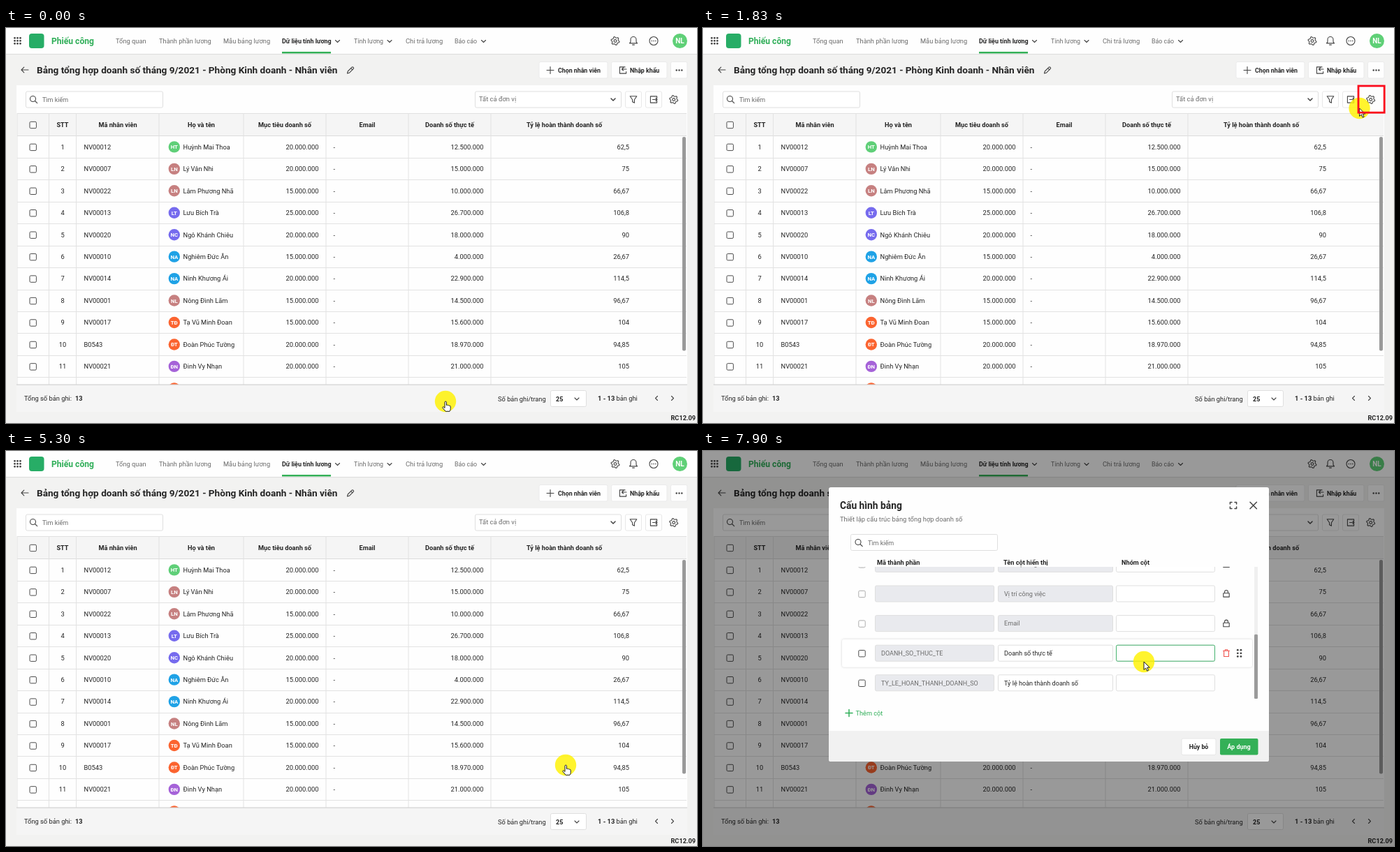
An HTML page that plays this animation: 989 px wide and 566 px high, repeating every 8 s.

```html
<!DOCTYPE html>
<html lang="vi">
<head>
<meta charset="utf-8">
<title>Bảng tổng hợp doanh số</title>
<style>
  html, body { margin: 0; width: 100%; height: 100%; overflow: hidden; background: #f2f2f1; }
  svg { display: block; width: 989px; height: 566px; }
  text { font-family: Roboto, "Noto Sans", sans-serif; fill: #242424; white-space: pre; }
  .b { font-weight: 700; }
  .m { text-anchor: middle; }
  .e { text-anchor: end; }
  .w { fill: #fff; }
  .g { fill: #6b6b6b; }
  .gr { fill: #2fae58; }
  .i { fill: none; stroke: #444; stroke-width: 1.1; stroke-linecap: round; stroke-linejoin: round; }
  .i.red { stroke: #f0544f; }
  .i.green { stroke: #2fae58; }
  .i.white { stroke: #fff; }
  .i.bold { stroke-width: 1.5; }
  #popup { filter: drop-shadow(0 1px 4px rgba(0, 0, 0, .28)); }
  #card { filter: drop-shadow(0 0 1.5px rgba(0, 0, 0, .18)); }
</style>
</head>
<body>
<svg id="stage" viewBox="0 0 989 566"></svg>
<script>
const GREEN = '#34b057';
const LOOP = 8000;

// ---------- drawing helpers ----------
const text = (x, y, s, size = 9.3, cls = '') =>
  `<text x="${x}" y="${(y + size * .355).toFixed(2)}" font-size="${size}" class="${cls}">${s}</text>`;
const rect = (x, y, w, h, fill, stroke = 'none', r = 0) =>
  `<rect x="${x}" y="${y}" width="${w}" height="${h}" rx="${r}" fill="${fill}" stroke="${stroke}"/>`;
const circle = (x, y, r, fill) => `<circle cx="${x}" cy="${y}" r="${r}" fill="${fill}"/>`;
const icon = (x, y, d, cls = '') => `<path class="i ${cls}" transform="translate(${x} ${y})" d="${d}"/>`;
const group = (id, body, attrs = '') => `<g id="${id}" ${attrs}>${body}</g>`;
const field = (x, y, w, fill = '#fff', stroke = '#dfdfdf') => rect(x + .5, y + .5, w, 23, fill, stroke, 2);
const range = (n, f) => Array.from({ length: n }, (_, k) => f(k)).join('');

const ring = r => `M${-r} 0a${r} ${r} 0 1 0 ${2 * r} 0a${r} ${r} 0 1 0 ${-2 * r} 0`;
const cog = 'M' + Array.from({ length: 24 }, (_, k) => {
  const a = k * Math.PI / 12 + Math.PI / 24;
  const r = k % 4 < 2 ? 6 : 4.5;
  return (r * Math.cos(a)).toFixed(2) + ' ' + (r * Math.sin(a)).toFixed(2);
}).join('L') + 'Z' + ring(1.9);

const D = {
  cog,
  search: 'M-5 -1a4 4 0 1 0 8 0a4 4 0 1 0 -8 0M2 2l3.2 3.2',
  down: 'M-3 -1.5l3 3 3 -3',
  left: 'M1.5 -3l-3 3 3 3',
  right: 'M-1.5 -3l3 3 -3 3',
  back: 'M5 0H-5M-1.2 -3.8L-5 0l3.8 3.8',
  plus: 'M-5 0H5M0 -5V5',
  close: 'M-4.7 -4.7L4.7 4.7M4.7 -4.7L-4.7 4.7',
  pencil: 'M-4.5 4.5l.8 -3 5.8 -5.8q1 -.8 2 .2t.2 2l-5.8 5.8zM.6 -3l2.4 2.4',
  trash: 'M-4.5 -3.4H4.5M-1.7 -3.6V-5H1.7V-3.6M-3.4 -3.4V4.8H3.4V-3.4',
  bell: 'M-5.5 3.4H5.5L4 1.4V-2a4 4 0 0 0 -8 0V1.4zM-1.4 5.6H1.4',
  funnel: 'M-4.8 -4.8H4.8L1.4 .2V4.8L-1.4 3.2V.2z',
  export: 'M4.6 -2V-4.6H-4.6V4.6H4.6V2M-1.5 0H5M3 -2l2 2 -2 2',
  import: 'M3 -4.6H-4.6V4.6H4.6V2M5 -1.5H-1.5M.5 -3.5l-2 2 2 2',
  lock: 'M-4.2 -.8H4.2V4.6H-4.2zM-2.4 -1V-2.6a2.4 2.4 0 0 1 4.8 0V-1',
  expand: 'M-4.6 -2V-4.6H-2M2 -4.6H4.6V-2M4.6 2V4.6H2M-2 4.6H-4.6V2',
  refresh: 'M-4.4 -1a4.5 4.5 0 0 1 8.2 -1.4M4.4 -4.6v2.6H1.8M4.4 1a4.5 4.5 0 0 1 -8.2 1.4M-4.4 4.6V2H-1.8',
  sliders: 'M-1.4 -2.6H5M-5 2.6H1M-4.6 -2.6a1.1 1.1 0 1 0 2.2 0a1.1 1.1 0 1 0 -2.2 0M2.2 2.6a1.1 1.1 0 1 0 2.2 0a1.1 1.1 0 1 0 -2.2 0',
  tick: 'M-2.6 0l1.9 2 3.3 -3.8'
};

const box = (x, y, stroke = '#4b4b4b') => rect(x - 4.7, y - 4.7, 9.4, 9.4, '#fff', stroke, 1.5);
const checked = (x, y, fill) => rect(x - 5, y - 5, 10, 10, fill, 'none', 1.5) + icon(x, y, D.tick, 'white bold');
const dots = (x, y, cols, rows, gap, r) => range(cols * rows, k =>
  circle(x + (k % cols) * gap, y + Math.floor(k / cols) * gap, r, '#444'));

// ---------- top bar and page title ----------
const header = () =>
  rect(0, 0, 989, 37, '#fefefe') + rect(0, 37, 989, 1, '#dcdcdc') +
  dots(12.5, 14.3, 3, 3, 4, 1.4) +
  rect(33, 8, 21.5, 21, '#27ad66', 'none', 4) +
  text(65, 18.5, 'Phiếu công', 12.1, 'b gr') +
  text(157, 18.5, 'Tổng quan', 9.3, 'g') +
  text(219, 18.5, 'Thành phần lương', 9.3, 'g') +
  text(311, 18.5, 'Mẫu bảng lương', 9.3, 'g') +
  text(395, 19, 'Dữ liệu tính lương', 8.9, 'b') + icon(474.5, 19, D.down) +
  text(498, 19, 'Tính lương', 8.9, 'g') + icon(549, 19, D.down) +
  text(572, 18.5, 'Chi trả lương', 9.4, 'g') +
  text(642, 19, 'Báo cáo', 8.9, 'g') + icon(683.5, 19, D.down) +
  rect(395, 34, 70, 2.5, GREEN) +
  icon(872, 18.5, D.cog) + icon(898, 18.5, D.bell) + icon(927, 18.5, ring(6)) +
  dots(924.3, 18.5, 3, 1, 2.7, .8) +
  circle(964.5, 18.5, 10.5, '#5fd077') + text(964.5, 18.7, 'NL', 10, 'b m w') +
  icon(27, 60, D.back) +
  text(44, 60.5, 'Bảng tổng hợp doanh số tháng 9/2021 - Phòng Kinh doanh - Nhân viên', 13.6, 'b') +
  icon(493, 60.5, D.pencil) +
  rect(763, 48.5, 98, 23.5, '#fefefe', '#ebebeb', 2) + icon(779, 60.5, D.plus) + text(790, 60.5, 'Chọn nhân viên', 8.8, 'b') +
  rect(866.5, 48.5, 79.5, 23.5, '#fefefe', '#ebebeb', 2) + icon(883, 60.5, D.import) + text(893, 60.5, 'Nhập khẩu', 8.8, 'b') +
  rect(951.5, 48.5, 23.5, 23.5, '#fefefe', '#ebebeb', 2) + dots(959.7, 60.5, 3, 1, 3.8, 1.2);

// ---------- table ----------
const STAFF = [
  ['NV00012', 'HT', 'Huỳnh Mai Thoa', 20000, 12500, '#5fcf78'],
  ['NV00007', 'LN', 'Lý Vân Nhi', 20000, 15000, '#c68080'],
  ['NV00022', 'LN', 'Lâm Phương Nhã', 15000, 10000, '#c68080'],
  ['NV00013', 'LT', 'Lưu Bích Trà', 25000, 26700, '#766bee'],
  ['NV00020', 'NC', 'Ngô Khánh Chiêu', 20000, 18000, '#766bee'],
  ['NV00010', 'NA', 'Nghiêm Đức Ân', 15000, 4000, '#1fa2e6'],
  ['NV00014', 'NA', 'Ninh Khương Ái', 20000, 22900, '#1fa2e6'],
  ['NV00001', 'NL', 'Nông Đình Lãm', 15000, 14500, '#c68080'],
  ['NV00017', 'TĐ', 'Tạ Vũ Minh Đoan', 15000, 15600, '#fb6430'],
  ['B0543', 'ĐT', 'Đoàn Phúc Tường', 20000, 18970, '#fb6430'],
  ['NV00021', 'ĐN', 'Đinh Vy Nhạn', 20000, 21000, '#a562d8']
];
const ROW_H = 31.45;
const money = k => String(k * 1000).replace(/\B(?=(\d{3})+$)/g, '.');
const percent = (a, b) => String(Math.round(a / b * 10000) / 100).replace('.', ',');

const staffRow = ([code, initials, name, goal, real, color], k) => {
  const y = 170.4 + ROW_H * k;
  return rect(16, Math.round(y + 15.4), 958, 1, '#e2e2e2') + box(38.7, y + .5) +
    text(81, y, k + 1, 9.3, 'm') + text(111.5, y, code) +
    circle(240.8, y, 8.2, color) + text(240.8, y + .2, initials, 7.8, 'b m w') +
    text(253.5, y, name) + text(447.5, y, money(goal), 9.4, 'e') + text(468.5, y, '-') +
    text(683.5, y, money(real), 9.4, 'e') + text(892, y, percent(real, goal), 9.3, 'e');
};

const table = () =>
  rect(15, 82, 960, 468, '#fefefe') +
  field(28, 90.5, 196) + icon(39.5, 102.5, D.search) + text(52, 102.5, 'Tìm kiếm', 9, 'g') +
  field(671, 90.5, 209) + text(677, 102, 'Tất cả đơn vị', 9.4, 'g') + icon(869, 102.5, D.down, 'bold') +
  field(886, 90.5, 23, '#fff', '#e8e8e8') + icon(898, 102.5, D.funnel) +
  field(915, 90.5, 23, '#fff', '#e8e8e8') + icon(927, 102.5, D.export) +
  group('gearHover', rect(944, 91, 23, 23, '#e0e0e0', 'none', 2)) + icon(955.7, 102.5, D.cog) +
  rect(16, 122, 958, 32, '#f5f5f5') + rect(16, 122, 958, 1, '#e0e0e0') + rect(16, 154, 958, 1, '#dcdcdc') +
  group('rowHover', rect(16, 375.5, 958, 31, '#e9faf2')) +
  box(38.7, 139) +
  [['STT', 81], ['Mã nhân viên', 160], ['Họ và tên', 279.5], ['Mục tiêu doanh số', 399], ['Email', 517],
   ['Doanh số thực tế', 635], ['Tỷ lệ hoàn thành doanh số', 799]]
    .map(([s, x]) => text(x, 138.5, s, 9.2, 'b m')).join('') +
  [15.5, 61, 100, 218.5, 339.5, 457.5, 575.5, 693.5].map(x => rect(x, 122, 1, 389, '#e2e2e2')).join('') +
  STAFF.map(staffRow).join('') +
  circle(240.8, 516.4, 8.2, '#fb6430') +
  group('rowTools', icon(929, 390.5, D.pencil) + icon(955, 390.5, D.trash, 'red')) +
  rect(968, 156, 5, 306.5, '#999', 'none', 2) +
  rect(15, 511, 960, 39, '#f5f5f5') + rect(15, 510.5, 960, 1.2, '#d2d2d2') +
  text(26, 531, 'Tổng số bản ghi:') + text(99, 531, '13', 9.2, 'b') +
  text(704, 531.5, 'Số bản ghi/trang') + field(779, 519, 51) + text(787, 531.5, '25', 9, 'b') +
  icon(817, 531.5, D.down) +
  text(847, 531, '<tspan font-weight="700">1 - 13</tspan> bản ghi') +
  icon(931, 530.5, D.left) + icon(954, 530.5, D.right) +
  text(951.5, 559, 'RC12.09', 9.2, 'b');

// ---------- column popup ----------
const COLUMNS = ['STT', 'Mã nhân viên', 'Họ và tên', 'Mục tiêu doanh số', 'Đơn vị công tác',
  'Vị trí công việc', 'Email', 'Doanh số thực tế', 'Tỷ lệ hoàn thành doanh số'];

const columnItem = (name, k) => {
  const y = 204.7 + 26.2 * k;
  const mark = k === 4 || k === 5 ? box(775.2, y + .3) : checked(775.2, y + .3, k < 3 ? '#97d6ab' : GREEN);
  return mark + text(786, y, name);
};

const popup = () =>
  rect(750, 121, 217, 346, '#fefefe', 'none', 2) +
  group('itemHover', rect(753, 375, 204, 26, '#e9faf2')) +
  text(760, 142.5, 'Tùy chỉnh cột', 12.25, 'b') + icon(945, 143, D.refresh) +
  rect(760.5, 162.5, 196, 23.5, '#fff', '#dfdfdf', 2) +
  group('focus', rect(760.5, 162.5, 196, 23.5, 'none', '#4fb878', 2) + rect(784, 169, 1, 11, '#222')) +
  icon(771.5, 174.5, D.search) + text(785, 174.5, 'Tìm kiếm', 9, 'g') +
  COLUMNS.map(columnItem).join('') +
  rect(750, 428, 217, 39, '#f3f3f3') +
  icon(771, 448, D.sliders) + text(781, 448, 'Cấu hình bảng', 8.75, 'b') +
  rect(904, 435.5, 53, 24, GREEN, 'none', 2) + text(930.5, 448, 'Lưu', 9, 'b m w');

// ---------- settings dialog ----------
const PITCH = 42.6;
const CODES = { 3: 'DOANH_SO_MUC_TIEU', 7: 'DOANH_SO_THUC_TE', 8: 'TY_LE_HOAN_THANH_DOANH_SO' };

const configRow = (name, k) => {
  const y = 189.5 + PITCH * k;
  const code = CODES[k];
  const grey = '#e9eaee';
  return box(227.5, y + .5, code ? '#4b4b4b' : '#ababab') +
    field(246, y - 12, 170, grey) + (code ? text(255, y, code, 9, 'g') : '') +
    field(422, y - 12, 164, code ? '#fff' : grey) + text(431, y, name, 9.1, code ? '' : 'g') +
    field(591, y - 12, 141) + (code ? '' : icon(749, y, D.lock));
};

const dialog = () =>
  rect(180, 52, 630, 393, '#fefefe', 'none', 3) +
  text(196, 78, 'Cấu hình bảng', 13.8, 'b') +
  text(196, 98, 'Thiết lập cấu trúc bảng tổng hợp doanh số', 9.4, 'g') +
  icon(759, 78, D.expand, 'bold') + icon(787.7, 78, D.close, 'bold') +
  field(211, 119, 210) + icon(223, 131.5, D.search) + text(236, 131.5, 'Tìm kiếm', 9, 'g') +
  text(249, 159.5, 'Mã thành phần', 9.2, 'b') + text(430, 159.5, 'Tên cột hiển thị', 9.2, 'b') +
  text(599, 159.5, 'Nhóm cột', 9.2, 'b') +
  `<g clip-path="url(#list)">` + group('rows',
    group('card', rect(199, 169.5, 587, 40, '#fff', 'none', 3)) +
    COLUMNS.map(configRow).join('') +
    group('cardTools', rect(591.5, 178, 141, 23, 'none', '#45b36e', 2) +
      icon(749, 189.5, D.trash, 'red') + dots(765.3, 185, 2, 3, 4.6, 1.4))) + '</g>' +
  rect(789, 166, 5, 189, '#f0f0f0') + group('thumb', rect(789, 166, 5, 92.3, '#9b9b9b', 'none', 1.5)) +
  icon(209, 375.5, D.plus, 'green bold') + text(218.5, 375.5, 'Thêm cột', 9.2, 'gr') +
  `<path d="M180 401H810V442a3 3 0 0 1 -3 3H183a3 3 0 0 1 -3 -3z" fill="#f1f1f1"/>` +
  rect(685, 412, 49, 23.5, '#fff', '#e6e6e6', 2) + text(709.5, 424, 'Hủy bỏ', 8.8, 'b m') +
  rect(740, 412, 54.5, 23.5, GREEN, 'none', 2) + text(767, 424, 'Áp dụng', 9, 'b m w');

// ---------- pointer ----------
const HAND = 'M-1 8V1.3a1.2 1.2 0 0 1 2.4 0V5.5q1.2 -.9 2.1 .3q1.2 -.7 1.9 .4q1.8 -.3 1.8 1.5V10.5q0 2 -1.2 3.8H.2L-4 9.4q-.6 -1.1 .5 -1.5q1 -.2 2.5 1.6z';
const ARROW = 'M0 0V11.5L2.7 9l1.9 4.2 1.9 -.9L4.7 8.2H8.2z';
const cursor = () =>
  circle(0, 0, 15.2, '#fff200').replace('/>', ' opacity=".82"/>') +
  ['hand', 'arrow'].map((id, k) =>
    group(id, `<path d="${k ? ARROW : HAND}" fill="#fff" stroke="#1a1a1a" stroke-width="1" stroke-linejoin="round"/>`)).join('');

document.getElementById('stage').innerHTML =
  '<defs><clipPath id="list"><rect x="190" y="166" width="599" height="189"/></clipPath></defs>' +
  rect(0, 0, 989, 566, '#f2f2f1') + header() + table() + group('popup', popup()) +
  group('shade', rect(0, 0, 989, 566, '#000')) + group('dialog', dialog()) +
  group('cursor', cursor()) +
  '<rect id="mark" fill="none" stroke="#fb0a1c" stroke-width="2.8"/>';

// ---------- motion ----------
const $ = Object.fromEntries([...document.querySelectorAll('[id]')].map(n => [n.id, n]));
const sine = p => (1 - Math.cos(Math.PI * p)) / 2;
const linear = p => p;

// Each stop: time, values, easing used on the way to it.
const PATH = [
  [1030, [629, 535]], [1200, [680, 492]], [1380, [812, 368]], [1560, [919, 206]], [1700, [937, 140]],
  [1830, [939.5, 115]], [1930, [946, 111]], [2060, [948, 110]],
  [3710, [948, 110]], [4530, [801, 450], sine],
  [6680, [801, 450]], [7460, [631, 302], sine]
];
const MARK = [[2880, [938, 83, 37.2, 38.2]], [3700, [753, 427.5, 99.5, 38], sine]];

function at(track, t) {
  const n = track.findIndex(s => s[0] > t);
  if (n < 0) return track[track.length - 1][1];
  if (n === 0) return track[0][1];
  const [t0, a] = track[n - 1];
  const [t1, b, ease = linear] = track[n];
  const p = ease((t - t0) / (t1 - t0));
  return a.map((v, k) => v + (b[k] - v) * p);
}

// Last value whose time has been reached.
const step = (t, first, ...stops) => stops.reduce((v, [time, next]) => t >= time ? next : v, first);
const within = (t, a, b) => t >= a && t < b;
const alpha = (node, a) => {
  node.style.display = a > 0 ? '' : 'none';
  node.style.opacity = a;
};
const move = (node, x, y) => node.setAttribute('transform', `translate(${x} ${y})`);

function draw(t) {
  const [cx, cy] = at(PATH, t);
  move($.cursor, cx, cy);
  const arrow = within(t, 1720, 2200) || t >= 6700;
  alpha($.arrow, +arrow);
  alpha($.hand, +!arrow);

  const hovered = +within(t, 1430, 1700);
  alpha($.rowHover, hovered);
  alpha($.rowTools, hovered);
  alpha($.gearHover, +within(t, 1960, 5300));

  alpha($.popup, step(t, 0, [2630, .35], [2665, .7], [2700, 1], [5300, 0]));
  alpha($.itemHover, +within(t, 4260, 4630));
  alpha($.focus, +(t < 5000));

  ['x', 'y', 'width', 'height'].forEach((name, k) => $.mark.setAttribute(name, at(MARK, t)[k]));
  const fadeIn = Math.min(1, Math.max(0, (t - 130) / 770));
  alpha($.mark, step(t, fadeIn, [5000, .5], [5130, 0]));

  alpha($.shade, step(t, 0, [5730, .25], [6100, .39], [6160, .4]));
  alpha($.dialog, step(t, 0, [5730, .6], [6100, 1]));

  const scroll = t >= 7560 ? 198 : 0;
  move($.rows, 0, -scroll);
  move($.thumb, 0, scroll * 96.7 / 198);
  const hot = step(t, -1, [7400, 3], [7560, -1], [7760, 7]);
  for (const part of [$.card, $.cardTools]) {
    alpha(part, +(hot >= 0));
    move(part, 0, PITCH * hot);
  }
}

const start = performance.now();
function tick() {
  draw((performance.now() - start) % LOOP);
  requestAnimationFrame(tick);
}
tick();
</script>
</body>
</html>
```
